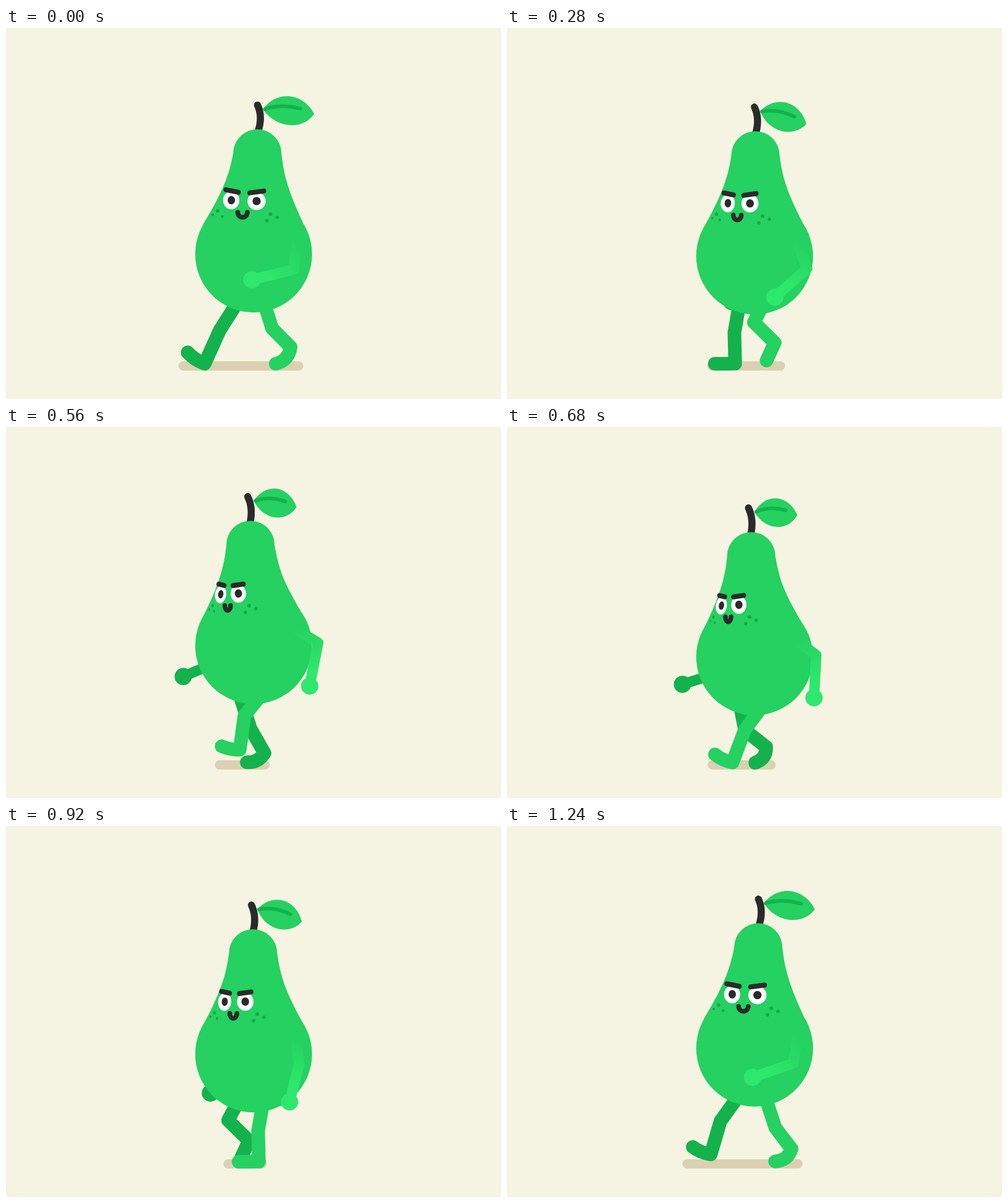
An HTML page with a canvas for the animation above (1.28 s loop, 800 by 600 pixels).

```html
<!DOCTYPE html>
<html lang="en">
<head>
<meta charset="utf-8">
<title>Walking pear</title>
<style>
html, body { margin: 0; width: 100%; height: 100%; overflow: hidden; background: #f5f4e2; }
canvas { display: block; width: 800px; height: 600px; }
</style>
</head>
<body>
<canvas id="stage" width="800" height="600"></canvas>
<script>
const ctx = document.getElementById('stage').getContext('2d');
const LOOP = 1280, HALF = LOOP / 2, STEP = 40, TAU = Math.PI * 2;
const BELLY = 94.4, GROUND = 543;
const COLOR = {
  sky: '#f5f4e2', shadow: '#dbd0b1', pear: '#25d160', far: '#14b24c',
  light: '#2ee86d', freckle: '#0fa946', dark: '#2b2a2b', white: '#ffffff'
};

// Closed paths of two cubic curves, half a loop each.
// Knee, elbow and hand heights count from the belly centre.
const PATH = {
  knee: [[345, 124], [335, 85], [416, 174], [390, 120], [360, 113], [344, 88]],
  ankle: [[321, 543], [335, 541], [425, 552], [420, 516], [417, 528], [365, 472]],
  toe: [[293.5, 524.5], [303, 554], [386, 539], [396, 543], [432, 577], [325, 488]],
  elbow: [[465.5, 24.5], [469, 43], [511, -4], [504, -8], [482, 20], [448, 24]],
  hand: [[397.5, 41.5], [385, 70], [498, 77], [494.5, 60], [512, 96], [385, 72]]
};

function follow([a, a1, a2, b, b1, b2], time) {
  const turn = time % LOOP / HALF, u = turn % 1, v = 1 - u;
  const [p, q, r, s] = turn < 1 ? [a, a1, a2, b] : [b, b1, b2, a];
  return [0, 1].map(i =>
    v * v * v * p[i] + 3 * v * v * u * q[i] + 3 * v * u * u * r[i] + u * u * u * s[i]);
}

function stroke(color, width, trace) {
  ctx.strokeStyle = color;
  ctx.lineWidth = width;
  ctx.beginPath();
  trace();
  ctx.stroke();
}

function oval(color, x, y, rx, ry = rx, turn = 0) {
  ctx.fillStyle = color;
  ctx.beginPath();
  ctx.ellipse(x, y, rx, ry, turn, 0, TAU);
  ctx.fill();
}

function polyline(...points) {
  points.forEach(([x, y], i) => i ? ctx.lineTo(x, y) : ctx.moveTo(x, y));
}

function shifted(x, y, paint) {
  ctx.save();
  ctx.translate(x, y);
  paint();
  ctx.restore();
}

// Widest at full stride, slightly wide again when the legs cross.
function drawShadow(t) {
  const a = TAU * (t - 40) / LOOP;
  const middle = 383.5 - 4.2 * Math.cos(2 * a);
  const reach = 53.7 + 27.3 * Math.cos(a) + 17.3 * Math.cos(2 * a) - 3.8 * Math.cos(3 * a);
  stroke(COLOR.shadow, 15, () => polyline([middle - reach, 546.5], [middle + reach, 546.5]));
}

function drawLeg(t, cy, color) {
  const [kx, ky] = follow(PATH.knee, t), [ax, ay] = follow(PATH.ankle, t);
  const [tx, swing] = follow(PATH.toe, t), ty = Math.min(swing, GROUND);
  const stride = Math.cos(TAU * t / LOOP), bend = Math.abs(stride ** 3) * (8 - 4 * stride);
  const dx = tx - ax, dy = ty - ay, k = bend / Math.hypot(dx, dy);
  stroke(color, 22, () => {
    polyline([376, cy + 75], [kx, cy + ky], [ax, ay]);
    ctx.quadraticCurveTo((ax + tx) / 2 + dy * k, (ay + ty) / 2 - dx * k, tx, ty);
  });
}

function drawFarArm(t) {
  const [hx, hy] = follow(PATH.hand, t + HALF);
  const x = 1.29 * hx - 228, y = 0.95 * hy;
  stroke(COLOR.far, 17, () => polyline([348, 24], [x, y]));
  oval(COLOR.far, x, y, 14);
}

function drawNearArm(t, c) {
  const shoulder = [469 + c, -24 + 3 * c];
  const elbow = follow(PATH.elbow, t), hand = follow(PATH.hand, t);
  const fade = ctx.createLinearGradient(...shoulder, ...hand);
  fade.addColorStop(0, COLOR.pear);
  fade.addColorStop(0.75, COLOR.light);
  stroke(fade, 17, () => polyline(shoulder, elbow, hand));
  oval(COLOR.light, ...hand, 14);
}

function drawStem(c) {
  stroke(COLOR.dark, 11.5, () => {
    ctx.moveTo(398.3 + 8.2 * c, -241);
    ctx.quadraticCurveTo(407.4 + 8.1 * c, -222, 400.3 + 6.7 * c, -197);
  });
}

function drawLeaf(t, c) {
  const len = 76.2 + 6.8 * c, bob = TAU * t / HALF;
  const tilt = 9.8 - 5.9 * Math.cos(bob - 0.2 - 0.52 * Math.cos(bob));
  ctx.rotate(tilt * Math.PI / 180);
  ctx.fillStyle = COLOR.pear;
  ctx.beginPath();
  ctx.moveTo(0, 0);
  ctx.bezierCurveTo(0.22 * len, -33, 0.75 * len, -33, len, 0);
  ctx.bezierCurveTo(0.8 * len, 28.7, 0.28 * len, 28.7, 0, 0);
  ctx.fill();
  stroke(COLOR.far, 6, () => {
    ctx.moveTo(3, -0.5);
    ctx.quadraticCurveTo(0.35 * len, -12, 0.72 * len, -6.5);
  });
}

function drawPear(c) {
  const top = 400.4 + 5.8 * c;
  oval(COLOR.pear, 400.2, 0, BELLY);
  ctx.beginPath();
  ctx.moveTo(316.5 + 1.5 * c, -43.7 - 3.8 * c);
  ctx.bezierCurveTo(350.5 + 4 * c, -104 - 2.5 * c, 357.5 + 4.5 * c, -134.5 - c, top - 39, -163);
  ctx.arc(top, -163, 39, Math.PI, 0);
  ctx.bezierCurveTo(445 + 4 * c, -123.6 - 2 * c, 452.5 + 5 * c, -102.6 + 3 * c, 478 + 1.6 * c, -53.7 + 2 * c);
  ctx.lineTo(400, 0);
  ctx.fill();
}

// Positions count from the bottom of the belly; c turns the head.
function drawFace(c) {
  const lean = (1 - c) * 0.07;
  const lx = 355.1 + 8.9 * c, ly = -179.3 - 2.1 * c;
  const rx = 389.7 + 15.3 * c, ry = -179.3 - 0.7 * c;
  oval(COLOR.white, lx, ly, 11 + 2.1 * c, 14.4, lean);
  oval(COLOR.white, rx, ry, 13.5 + 1.2 * c, 14.5);
  oval(COLOR.dark, lx + 0.2, ly - 0.2, 5.1 + 0.9 * c, 6.8, lean);
  oval(COLOR.dark, rx, ry - 0.2, 6.3 + 0.4 * c, 6.7);

  stroke(COLOR.dark, 8, () => {
    polyline([349.6 + 5.9 * c, -196.1 - 2.4 * c], [363.5 + 12 * c, -193.1 - 1.4 * c]);
    polyline([380 + 14 * c, -192.5 - c], [399.3 + 17.2 * c, -195.2 - 1.3 * c]);
  });
  stroke(COLOR.dark, 7.5, () =>
    ctx.ellipse(369.8 + 12.5 * c, -160.6 - 1.4 * c, 6.15 + 1.65 * c, 8, 0, Math.PI, 0, true));

  const leftDot = (x, y, r, slide) =>
    oval(COLOR.freckle, x + slide * c, y - 2.6 * c, r * (0.84 + 0.16 * c), r);
  const rightDot = (x, y, r) => oval(COLOR.freckle, x + 18 * c, y, r);
  leftDot(337.8, -161.6, 2.8, 4.2);
  leftDot(331.2, -155.2, 2, 2.8);
  leftDot(342.5, -152.4, 2.3, 7);
  rightDot(409.5, -159, 3);
  rightDot(403.5, -148.3, 2.7);
  rightDot(420.3, -154, 2.7);
}

function draw(t) {
  const turn = Math.cos(TAU * t / LOOP);
  const cy = 364.1 + 16.5 * Math.cos(TAU * (t - 150) / HALF);
  ctx.fillStyle = COLOR.sky;
  ctx.fillRect(0, 0, 800, 600);
  ctx.lineCap = ctx.lineJoin = 'round';

  drawShadow(t);
  drawLeg(t, cy, COLOR.far);
  shifted(40, 0, () => drawLeg(t + HALF, cy, COLOR.pear));
  shifted(0, cy, () => {
    drawFarArm(t);
    drawStem(turn);
    shifted(407.6 + 7.8 * turn, -234.3, () => drawLeaf(t, turn));
    drawPear(turn);
    shifted(0, BELLY, () => drawFace(turn));
    drawNearArm(t, turn);
  });
}

function tick() {
  draw(Math.floor(performance.now() % LOOP / STEP) * STEP);
  requestAnimationFrame(tick);
}
tick();
</script>
</body>
</html>
```
